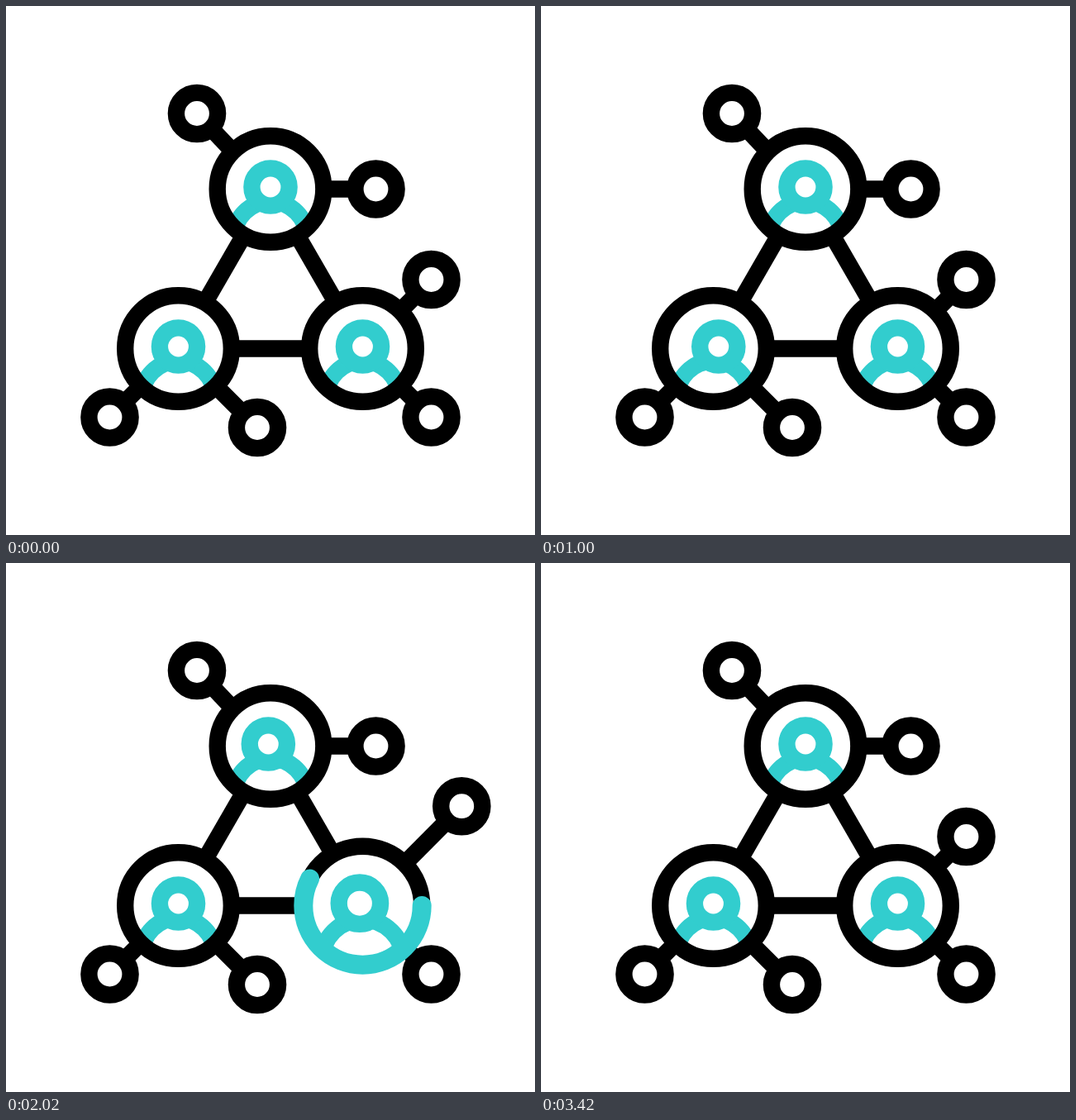
An HTML page with a canvas for the animation above (3600 ms loop, 640 px wide and 640 px high).

```html
<!DOCTYPE html>
<html lang="en">
<head>
<meta charset="utf-8">
<title>People network</title>
<style>
html, body { margin: 0; width: 100%; height: 100%; overflow: hidden; background: #fff; }
canvas { display: block; width: 640px; height: 640px; }
</style>
</head>
<body>
<canvas id="stage" width="640" height="640"></canvas>
<script>
const ctx = document.getElementById('stage').getContext('2d');
const LOOP = 3600, STEP = 20, BEAT = 400;
const TEAL = '#32cdce', BLACK = '#000', WHITE = '#fff';
const LINE = 20.4, TRIM = 23, RING = 64.3, DOT = 25.1;
const SWAY = 6.3, TAU = Math.PI * 2;

// grow: extra scale at the peak; side: first direction of the head
const hubs = [
  { x: 208.5, y: 414.5, start: 200, grow: 0.2, side: -1 },
  { x: 320, y: 221.5, start: 1000, grow: 0.28, side: 1 },
  { x: 431.5, y: 414.5, start: 1800, grow: 0.2, side: -1 }
];
const [left, top_, right] = hubs;

// root: where the stem leaves its hub; trips: start time and reach
const dots = [
  { x: 231, y: 130, root: [274.5, 176], trips: [[1000, -48.6, -54], [2600, -31.5, -38]] },
  { x: 447.5, y: 221.5, root: [385, 221.5], trips: [] },
  { x: 514.5, y: 331, root: [477, 369], trips: [[1800, 64, -64]] },
  { x: 514.5, y: 497.5, root: [477, 460], trips: [[2600, 51.5, 47.5]] },
  { x: 304, y: 510, root: [254, 460], trips: [[2600, 37, 37]] },
  { x: 125.5, y: 497.5, root: [163, 460], trips: [[200, -48, 48]] }
];

function ease(t, start) {
  const u = Math.min(1, Math.max(0, (t - start) / BEAT));
  return u * u * (3 - 2 * u);
}

const pulse = (t, start) => ease(t, start) - ease(t, start + BEAT);

function line(x1, y1, x2, y2) {
  ctx.strokeStyle = BLACK;
  ctx.lineWidth = LINE;
  ctx.beginPath();
  ctx.moveTo(x1, y1);
  ctx.lineTo(x2, y2);
  ctx.stroke();
}

function circle(x, y, r, color, fill) {
  ctx.beginPath();
  ctx.arc(x, y, r, 0, TAU);
  if (fill) {
    ctx.fillStyle = fill;
    ctx.fill();
  }
  ctx.strokeStyle = color;
  ctx.lineWidth = LINE;
  ctx.stroke();
}

function drawDot(dot, t) {
  let { x, y } = dot;
  for (const [start, dx, dy] of dot.trips) {
    const p = pulse(t, start);
    x += dx * p;
    y += dy * p;
  }
  line(...dot.root, x, y);
  circle(x, y, DOT, BLACK, WHITE);
}

function drawHub(hub, t) {
  const { x, y, start } = hub;
  const s = 1 + hub.grow * pulse(t, start);
  const r = RING * s;
  const sway = ease(t, start) - 2 * ease(t, start + BEAT) + ease(t, start + 2 * BEAT);

  ctx.save();
  ctx.beginPath();
  ctx.arc(x, y, r, 0, TAU);
  ctx.fillStyle = WHITE;
  ctx.fill();
  ctx.clip();
  circle(x, y + 59.5 * s, 44.5 * s, TEAL);
  // keep only the upper half of the shoulders
  ctx.fillRect(x - 34 * s, y + 59.5 * s, 68 * s, 60 * s);
  circle(x + hub.side * SWAY * sway, y - 2.5 * s, 22.6 * s, TEAL, WHITE);
  ctx.restore();

  circle(x, y, r, BLACK);

  const from = ease(t, start + BEAT), to = ease(t, start);
  if (to > from) {
    ctx.beginPath();
    ctx.arc(x, y, r, from * TAU, to * TAU);
    ctx.strokeStyle = TEAL;
    ctx.lineWidth = TRIM;
    ctx.lineCap = 'round';
    ctx.stroke();
    ctx.lineCap = 'butt';
  }
}

function draw(t) {
  ctx.fillStyle = WHITE;
  ctx.fillRect(0, 0, 640, 640);
  for (const [a, b] of [[left, top_], [top_, right], [right, left]]) line(a.x, a.y, b.x, b.y);
  for (const dot of dots) drawDot(dot, t);
  for (const hub of hubs) drawHub(hub, t);
}

const begin = performance.now();
function tick() {
  const t = (performance.now() - begin) % LOOP;
  draw(Math.floor(t / STEP) * STEP);
  requestAnimationFrame(tick);
}
tick();
</script>
</body>
</html>
```
